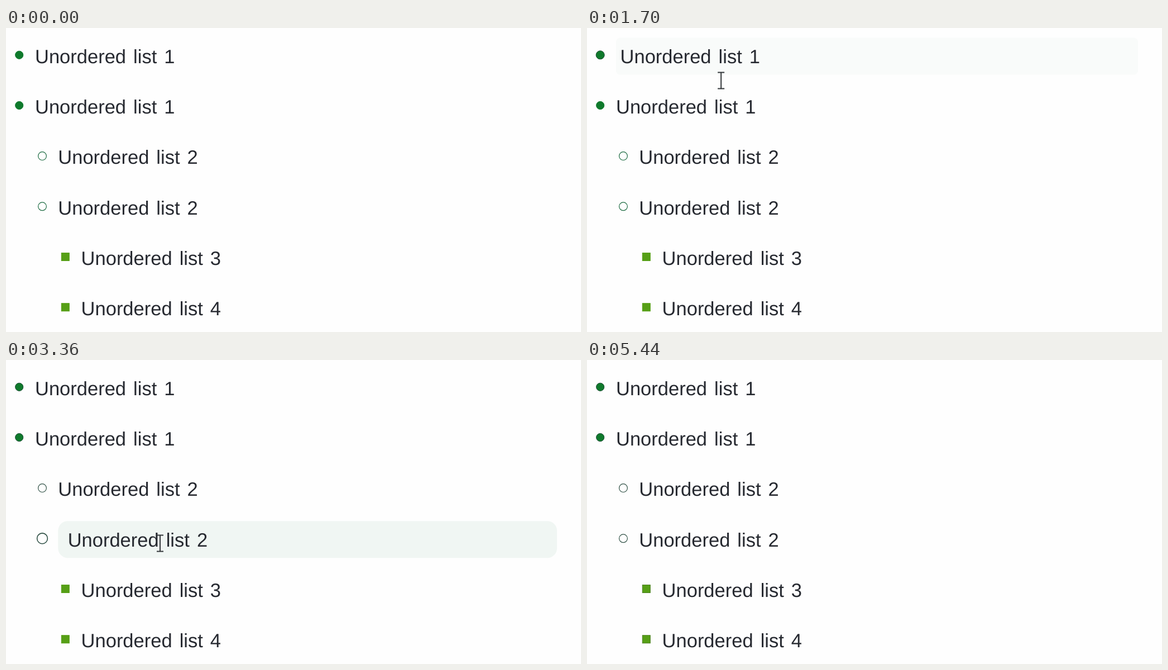
Animation, 1030 px wide and 544 px high, one loop 6.31 s. Source, as an HTML page:

```html
<!DOCTYPE html>
<html lang="en">
<head>
<meta charset="utf-8">
<title>List hover</title>
<style>
  html, body { margin: 0; width: 100%; height: 100%; overflow: hidden; background: #fefefe; }
  svg { display: block; }
  text {
    font: 34.5px "Liberation Sans", Arial, sans-serif;
    word-spacing: .1em;
    text-rendering: geometricPrecision;
    fill: #262930;
  }
</style>
</head>
<body>
<svg id="stage" width="1030" height="544" viewBox="0 0 1030 544"></svg>
<script>
const LOOP = 6310, START = 850, TICKS = 66, TICK = 4590 / TICKS;
const FADE = 300 / TICK;
const PITCH = 90.2, INDENT = 41.3, PAD = 17.35, RIGHT = 987;
const BOX_TOP = 17.6, BOX_HEIGHT = 66;
const stage = document.getElementById('stage');

// Pointer path, straight between key points
const path = [
  [0, 219, 0], [7, 236, 57], [19, 246, 146], [25, 262, 258], [36, 276, 328],
  [51, 295, 428], [55, 299, 488], [57, 299, 488], [61, 303, 540]
].map(([tick, x, y]) => ({ tick, x, y }));

// Any pointer property as a function of another, e.g. the tick at a given y
function along(from, value, to) {
  const next = path.findIndex(key => key[from] > value);
  const a = path[next - 1], b = path[next];
  return a[to] + (b[to] - a[to]) * (value - a[from]) / (b[from] - a[from]);
}

const rows = [1, 1, 2, 2, 3, 4].map((number, i) => {
  const level = i >> 1, y = i * PITCH, left = 52 + level * INDENT, top = y + BOX_TOP;
  const box = add('rect', { x: left, y: top, width: RIGHT - left, height: BOX_HEIGHT, fill: '#f0f6f3' });
  const marker = add(level === 2 ? 'rect' : 'circle');
  const label = add('text', { y: y + 63 });
  label.textContent = 'Unordered list ' + number;
  return {
    level, y, left, box, marker, label,
    enter: along('y', top, 'tick'),
    leave: along('y', top + BOX_HEIGHT, 'tick')
  };
});

const pointer = add('path', {
  d: 'M-6-14.5H6M-6 14.5H6M0-14.5V14.5', fill: 'none', stroke: '#33373a', 'stroke-width': 2
});

function add(tag, attrs = {}) {
  const node = document.createElementNS('http://www.w3.org/2000/svg', tag);
  set(node, attrs);
  return stage.appendChild(node);
}

function set(node, attrs) {
  for (const name in attrs) node.setAttribute(name, attrs[name]);
}

// The CSS "ease" curve, cubic-bezier(.25, .1, .25, 1)
function ease(x) {
  if (x <= 0) return 0;
  if (x >= 1) return 1;
  const curve = (a, b, u) => 3 * a * u * (1 - u) ** 2 + 3 * b * u * u * (1 - u) + u ** 3;
  let low = 0, high = 1;
  for (let i = 0; i < 20; i++) {
    const mid = (low + high) / 2;
    if (curve(.25, .25, mid) < x) low = mid; else high = mid;
  }
  return curve(.1, 1, low);
}

function drawMarker({ level, marker, left, y }, hover, visited) {
  const cx = left - 28.3, cy = y + 48.3;
  if (level === 0) {
    set(marker, { cx, cy, r: 7.1 + hover, fill: '#0f7a2c', stroke: visited ? '#1c4a34' : '#0f7a2c' });
  } else if (level === 1) {
    set(marker, {
      cx, cy: cy + .4, r: 7.4 + 2 * hover, fill: 'none',
      stroke: visited ? '#2f5045' : '#1b6a40', 'stroke-width': 1.2 + .4 * hover
    });
  } else {
    const size = 14 + 2 * hover;
    set(marker, {
      x: cx - size / 2, y: cy + .4 - size / 2, width: size, height: size,
      fill: '#569f16', stroke: visited ? '#4a7f20' : '#569f16'
    });
  }
}

function draw(now) {
  const tick = Math.min(TICKS, Math.floor((now % LOOP - START + 1) / TICK));
  for (const row of rows) {
    const hover = ease((tick - row.enter) / FADE) - ease((tick - row.leave) / FADE);
    set(row.box, { opacity: hover, rx: PAD * hover });
    set(row.label, { x: row.left + PAD * hover });
    drawMarker(row, hover, tick >= row.enter);
  }
  const visible = tick >= 0 && tick < path.at(-1).tick;
  pointer.style.display = visible ? '' : 'none';
  if (visible) {
    set(pointer, { transform: `translate(${along('tick', tick, 'x')} ${along('tick', tick, 'y')})` });
  }
}

let origin;
function animate(now) {
  origin ??= now;
  draw(now - origin);
  requestAnimationFrame(animate);
}
draw(0);
requestAnimationFrame(animate);
</script>
</body>
</html>
```
